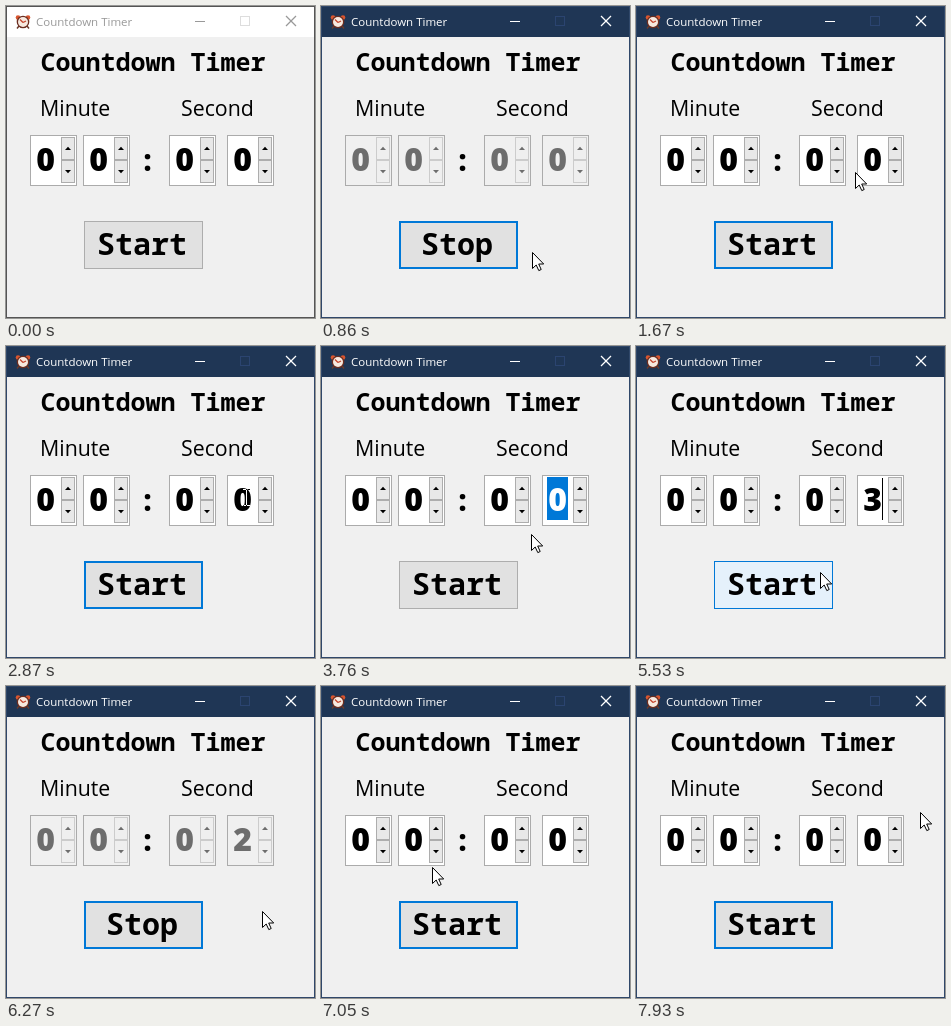
An HTML page with a canvas that plays this animation: 309 px wide and 312 px high, repeating every 8000 ms.

```html
<!DOCTYPE html>
<html lang="en">
<head>
<meta charset="utf-8">
<title>Countdown Timer</title>
<style>
html, body { margin: 0; width: 100%; height: 100%; overflow: hidden; background: #f0f0f0; }
canvas { display: block; }
</style>
</head>
<body>
<canvas id="stage" width="309" height="312"></canvas>
<script>
const ctx = document.getElementById('stage').getContext('2d');
const LOOP = 8000, BLUE = '#0078d7';
const MONO = '"Noto Sans Mono", "DejaVu Sans Mono", monospace';
const SANS = '"Open Sans", "Noto Sans", sans-serif';
const FIELDS = [24, 77, 163, 221];

// Moments of the session, in ms
const CLICKS = [450, 5990], RUN = 740, PRESS = 70;
const FOCUS = 3000, SELECT = 3200, TYPE = 5250;

// Pointer stops: arrival time, x, y; it rests briefly, then eases to the next
const REST = 70;
const STOPS = [
  [0, 230, 335], [450, 164, 246], [860, 211, 246], [1750, 219, 164],
  [2200, 172, 158], [2870, 240, 151], [3300, 228, 150], [4370, 174, 263],
  [5200, 258, 145], [5530, 184, 226], [5990, 182, 240], [6270, 256, 225],
  [7400, 62, 166], [7800, 106, 161], [7930, 284, 126]
];

const within = (v, a, b) => v >= a && v < b;

function pointerAt(t) {
  const i = STOPS.findLastIndex(s => s[0] <= t);
  const [t0, x0, y0] = STOPS[i], [t1, x1, y1] = STOPS[i + 1] || [LOOP, x0, y0];
  const k = Math.max(0, (t - t0 - REST) / (t1 - t0 - REST));
  const ease = k * k * (3 - 2 * k);
  return { x: Math.round(x0 + (x1 - x0) * ease), y: Math.round(y0 + (y1 - y0) * ease) };
}

function stateAt(t) {
  const second = CLICKS[1];
  const left = Math.min(1, 1 - (t - second) / RUN);
  return {
    ptr: pointerAt(t),
    active: t >= CLICKS[0] - PRESS,
    running: CLICKS.some(c => within(t, c, c + RUN)),
    pressed: CLICKS.some(c => within(t, c - PRESS, c)),
    buttonFocus: within(t, CLICKS[0], FOCUS) || t >= second,
    selected: within(t, SELECT, TYPE),
    caret: within(t, TYPE, second),
    value: t < TYPE ? 0 : Math.max(0, Math.ceil(3 * left))
  };
}

function rect(x, y, w, h, fill) {
  ctx.fillStyle = fill;
  ctx.fillRect(x, y, w, h);
}

function panel(x, y, w, h, fill, border, line = 1) {
  rect(x, y, w, h, border);
  rect(x + line, y + line, w - 2 * line, h - 2 * line, fill);
}

function text(str, x, y, font, color = '#000', align = 'left') {
  ctx.font = font;
  ctx.textAlign = align;
  ctx.fillStyle = color;
  ctx.fillText(str, x, y);
}

function line(x1, y1, x2, y2, color, width = 1) {
  ctx.beginPath();
  ctx.moveTo(x1, y1);
  ctx.lineTo(x2, y2);
  ctx.strokeStyle = color;
  ctx.lineWidth = width;
  ctx.stroke();
}

function disc(x, y, r, color) {
  ctx.beginPath();
  ctx.arc(x, y, r, 0, 7);
  ctx.fillStyle = color;
  ctx.fill();
}

function drawClock(x, y) {
  for (const side of [-1, 1]) {
    disc(x + side * 5, y - 4.5, 2.3, '#d9562f');
    line(x + side * 4, y + 4, x + side * 6, y + 6.5, '#6b3a2a', 1.5);
  }
  disc(x, y, 6.3, '#6b2d20');
  disc(x, y, 5, '#f7e9df');
  line(x, y + 0.5, x - 3, y - 2.5, '#c4432b', 1.3);
  line(x, y + 0.5, x + 3, y - 1, '#c4432b', 1.3);
}

function drawWindow({ active }) {
  const ink = active ? '#fff' : '#999';
  panel(0, 0, 309, 312, '#f0f0f0', active ? '#30486a' : '#555');
  rect(1, 1, 307, 30, active ? '#1f3655' : '#fff');
  drawClock(17, 16);
  text('Countdown Timer', 30, 20, '11.5px ' + SANS, ink);
  rect(189, 15, 10, 1, ink);
  ctx.strokeStyle = active ? '#2b4470' : '#ddd';
  ctx.lineWidth = 1;
  ctx.strokeRect(234.5, 10.5, 9, 9);
  line(280, 10, 290, 20, ink, 1.3);
  line(290, 10, 280, 20, ink, 1.3);
}

function drawSpin(x, y, h, dir, hover, off) {
  panel(x, y, 14, h, off ? '#efefef' : hover ? '#e5f1fb' : '#e8e8e8',
    off ? '#ccc' : hover ? BLUE : '#adadad');
  const cx = x + 7, cy = y + h / 2;
  ctx.beginPath();
  ctx.moveTo(cx - 3, cy + 1.5 * dir);
  ctx.lineTo(cx + 3, cy + 1.5 * dir);
  ctx.lineTo(cx, cy - 1.7 * dir);
  ctx.fillStyle = off ? '#6d6d6d' : '#000';
  ctx.fill();
}

function drawField(x, digit, s, last) {
  const off = s.running, { x: px, y: py } = s.ptr;
  const over = !off && within(px, x + 31, x + 45);
  const marked = last && s.selected;
  panel(x, 129, 47, 51, off ? '#f0f0f0' : '#fff', '#ababab');
  if (marked) rect(x + 5, 131, 21, 43, BLUE);
  text(digit, x + 15.5, 165, '800 32px ' + SANS, off ? '#6d6d6d' : marked ? '#fff' : '#000', 'center');
  if (last && s.caret) rect(x + 25, 132, 1, 42, '#000');
  drawSpin(x + 31, 131, 23, 1, over && within(py, 131, 154), off);
  drawSpin(x + 31, 154, 23, -1, over && within(py, 154, 177), off);
}

function drawButton(s) {
  const hover = within(s.ptr.x, 78, 197) && within(s.ptr.y, 215, 264);
  const box = (...style) => panel(78, 215, 119, 48, ...style);
  if (s.pressed) box('#cce4f7', '#005499');
  else if (hover) box('#e5f1fb', BLUE);
  else if (s.buttonFocus) box('#e1e1e1', BLUE, 2);
  else box('#e1e1e1', '#adadad');
  text(s.running ? 'Stop' : 'Start', 136, 249, 'bold 30px ' + MONO, '#000', 'center');
}

function drawPointer({ ptr: { x, y }, running }) {
  const onText = !running && within(y, 130, 179) && FIELDS.some(f => within(x, f + 1, f + 31));
  ctx.save();
  ctx.translate(x, y);
  if (onText) {
    ctx.globalCompositeOperation = 'difference';
    rect(0, -7, 1, 15, '#fff');
    for (const top of [-8, 8]) {
      rect(-3, top, 3, 1, '#fff');
      rect(1, top, 3, 1, '#fff');
    }
  } else {
    const arrow = new Path2D('M.5 .5V16.5L4.2 13L6.8 18.6L9.2 17.5L6.7 12H11.7Z');
    ctx.fillStyle = '#fff';
    ctx.fill(arrow);
    ctx.strokeStyle = '#000';
    ctx.lineWidth = 1;
    ctx.stroke(arrow);
  }
  ctx.restore();
}

function draw(now) {
  const s = stateAt(now % LOOP);
  drawWindow(s);
  text('Countdown Timer', 34.5, 65, 'bold 25px ' + MONO);
  text('Minute', 34, 110, '21.33px ' + SANS);
  text('Second', 175, 110, '21.33px ' + SANS);
  text(':', 141.5, 165, 'bold 31px ' + MONO, '#000', 'center');
  FIELDS.forEach((x, i) => drawField(x, i === 3 ? s.value : 0, s, i === 3));
  drawButton(s);
  drawPointer(s);
}

const start = performance.now();
function tick() {
  draw(performance.now() - start);
  requestAnimationFrame(tick);
}
tick();
</script>
</body>
</html>
```
